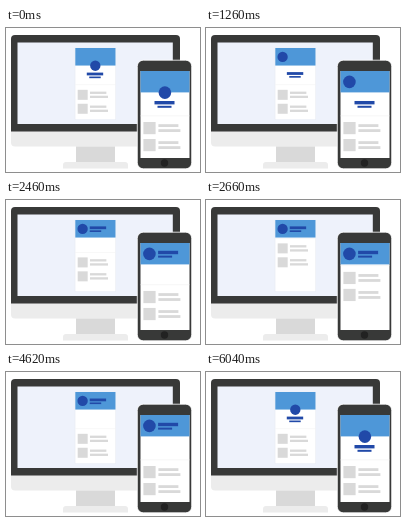
Write an HTML page that moves like this. It is 194 by 144 pixels and loops after 7.06 s.

```html
<!DOCTYPE html>
<html lang="en">
<head>
<meta charset="utf-8">
<title>Responsive profile page</title>
<style>
html, body { margin: 0; width: 100%; height: 100%; overflow: hidden; background: #fff; }
svg { display: block; width: 100%; height: 100%; }
</style>
</head>
<body>
<svg viewBox="0 0 194 144">
  <defs>
    <g id="row" fill="#d9d9d9">
      <rect width="12.2" height="12.2"/>
      <rect x="15" y="2.2" width="20" height="2.8"/>
      <rect x="15" y="7.2" width="22" height="2.8"/>
    </g>
  </defs>

  <!-- monitor -->
  <path d="M5 102h169v12.500a4 4 0 0 1-4 4H9a4 4 0 0 1-4-4z" fill="#ececec"/>
  <rect x="70" y="118.500" width="39" height="16" fill="#d9d9d9"/>
  <path d="M57 140.500v-3.500a3 3 0 0 1 3-3h59a3 3 0 0 1 3 3v3.500z" fill="#ececec"/>
  <path d="M5 103.500V11a4 4 0 0 1 4-4h161a4 4 0 0 1 4 4v92.500z" fill="#383938"/>
  <rect x="11.500" y="14.500" width="155.300" height="81.500" fill="#eef2fb"/>
  <rect x="68.800" y="19.800" width="41.200" height="71.700" fill="#e4e8f0"/>
  <g class="page" transform="translate(69.300 20) scale(.82)"></g>

  <!-- phone -->
  <rect x="131.300" y="32.200" width="54.400" height="108.600" rx="6" fill="#383938" stroke="#fff" stroke-width=".8"/>
  <circle cx="158.500" cy="135" r="3.700" fill="#222"/>
  <g class="page" transform="translate(134.500 43)"></g>
</svg>
<script>
const LOOP = 7060, MOVE = 295, LAG = 25;
const pages = [...document.querySelectorAll('.page')];

for (const page of pages) {
  page.innerHTML = `
    <rect width="49" height="87" fill="#fff"/>
    <g class="list">
      <rect width="49" height=".6" y="44.6" fill="#f0f0f0"/>
      <use href="#row" x="2.900" y="51"/>
      <use href="#row" x="2.900" y="68"/>
    </g>
    <rect width="49" height="21.400" fill="#4e97d8"/>
    <circle class="avatar" r="6.300" fill="#2149a8"/>
    <rect class="name" width="20" height="3.400" fill="#2149a8"/>
    <rect class="role" width="14" height="2" fill="#2149a8"/>`;
}

const ease = p => (1 - Math.cos(Math.PI * Math.min(1, Math.max(0, p)))) / 2;
const mix = (a, b, p) => a + (b - a) * p;

// 0 → 1 from `go`, then back to 0 from `back`
const phase = (t, go, back) => ease((t - go) / MOVE) - ease((t - back) / MOVE);

function place(page, name, from, to, p) {
  const x = mix(from[0], to[0], p), y = mix(from[1], to[1], p);
  page.querySelector('.' + name).setAttribute('transform', `translate(${x} ${y})`);
}

// the phone follows the monitor slightly later
function draw(time) {
  pages.forEach((page, i) => {
    const t = time - i * LAG;
    const avatar = phase(t, 105, 5725);
    const text = phase(t, 1230, 4605);
    const list = phase(t, 2365, 3485);
    place(page, 'avatar', [24.4, 21.6], [8.9, 10.9], avatar);
    place(page, 'name', [14, 30], [17.6, 7.8], text);
    place(page, 'role', [17, 34.8], [17.6, 12.6], text);
    place(page, 'list', [0, 0], [0, -22.5], list);
  });
}

const start = performance.now();
function tick() {
  draw((performance.now() - start) % LOOP);
  requestAnimationFrame(tick);
}
draw(0);
requestAnimationFrame(tick);
</script>
</body>
</html>
```
